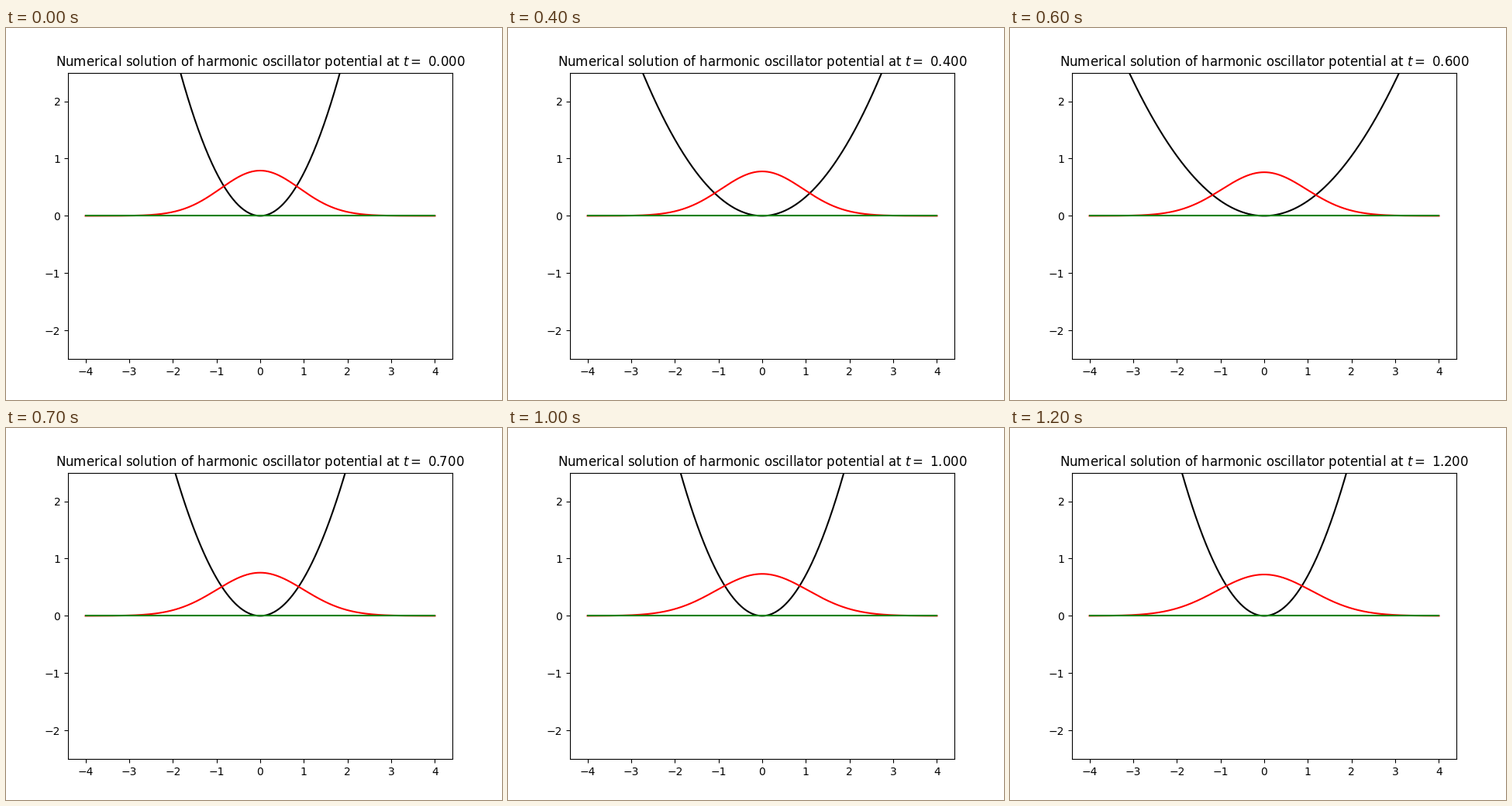
Write a matplotlib script that moves like this. It is 640x480 px and loops after 1.3 s.

```python
import numpy as np
import matplotlib.pyplot as plt
from matplotlib.animation import FuncAnimation

FRAMES = 13
DT = 0.1
DRIVE = 25.67          # angular frequency of the trap modulation
A0 = np.sqrt(1.5) / 2  # exponent of the starting ground state

x = np.linspace(-4, 4, 401)


def potential(t):
    return (0.5 + 0.25 * np.cos(DRIVE * t)) * x**2


def amplitude(t):
    # Gaussian breathing in the time-averaged trap of unit frequency
    a = A0 / (1 + 0.5 * np.sin(t)**2)
    return (2 * a / np.pi)**0.25 * np.exp(-a * x**2)


fig, ax = plt.subplots(figsize=(6.4, 4.8), dpi=100)
trap, = ax.plot(x, potential(0), color="black")
wave, = ax.plot(x, amplitude(0), color="red")
ax.plot(x, np.zeros_like(x), color="green")
ax.set_xlim(-4.4, 4.4)
ax.set_ylim(-2.5, 2.5)
title = ax.set_title("")


def update(i):
    t = i * DT
    trap.set_ydata(potential(t))
    wave.set_ydata(amplitude(t))
    title.set_text("Numerical solution of harmonic oscillator potential "
                   f"at $t=$ {t:.3f}")
    return trap, wave, title


anim = FuncAnimation(fig, update, frames=FRAMES, interval=100,
                     repeat=True, repeat_delay=0, blit=False)
plt.show()
```
